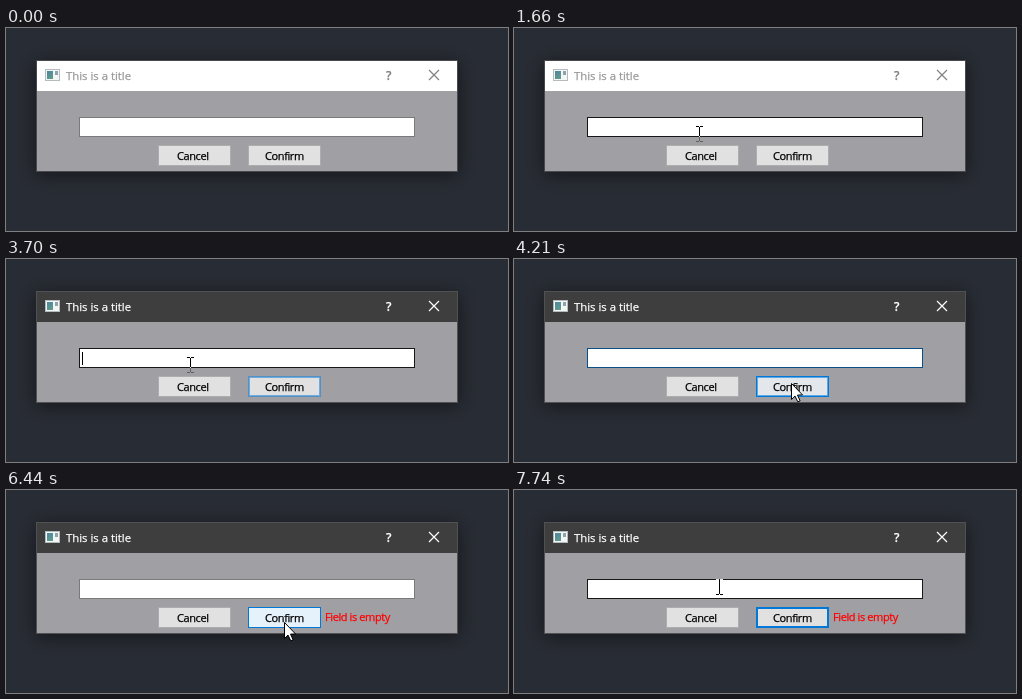
These frames come from a looping animation (502x203 px, 8 s). An HTML page with a canvas:

```html
<!DOCTYPE html>
<html lang="en">
<head>
<meta charset="utf-8">
<title>Dialog</title>
<style>
html, body { margin: 0; width: 100%; height: 100%; overflow: hidden; background: #282c34; }
canvas { display: block; }
</style>
</head>
<body>
<canvas id="stage" width="502" height="203"></canvas>
<script>
const ctx = document.getElementById('stage').getContext('2d');
const LOOP = 8000, BLINK = 530, FADE = 300;
const ACTIVATE = 3650, PRESS = 5040, RELEASE = 5130, REFOCUS = 7210;
const BLUE = '#0078d7';

const FIELD = { x: 73, y: 89, w: 336, h: 20 };
const CANCEL = { x: 152, y: 117, w: 73, h: 21 };
const CONFIRM = { x: 242, y: 117, w: 73, h: 21 };

// Stops of the pointer; it slows down towards each one
const STOPS = [
  { t: 310, x: 318, y: 178 },
  { t: 820, x: 251, y: 88 },
  { t: 1100, x: 210, y: 100 },
  { t: 1510, x: 185, y: 106 },
  { t: 4030, x: 184, y: 106 },
  { t: 4210, x: 277, y: 124 },
  { t: 4390, x: 292, y: 131 },
  { t: 4770, x: 291, y: 130 },
  { t: 6400, x: 291, y: 130 },
  { t: 6440, x: 278, y: 132 },
  { t: 6640, x: 276, y: 132 },
  { t: 7150, x: 193, y: 92 },
  { t: 7420, x: 205, y: 97 }
];

const clamp = v => Math.max(0, Math.min(1, v));
const ramp = (t, start, length) => clamp((t - start) / length);
const easeOut = k => 1 - (1 - k) ** 2;
const inside = (p, r) => p.x >= r.x && p.x < r.x + r.w && p.y >= r.y && p.y < r.y + r.h;

function pointerAt(t) {
  const next = STOPS.findIndex(s => s.t > t);
  if (next < 0) return STOPS[STOPS.length - 1];
  if (next === 0) return { x: -50, y: -50 };
  const a = STOPS[next - 1], b = STOPS[next];
  const k = easeOut(ramp(t, a.t, b.t - a.t));
  return { x: Math.round(a.x + (b.x - a.x) * k), y: Math.round(a.y + (b.y - a.y) * k) };
}

// Share of the last moments that the pointer spent over an area
function hover(t, area) {
  const steps = 30;
  let hits = 0;
  for (let i = 0; i < steps; i++) {
    if (inside(pointerAt(t - FADE * i / steps), area)) hits++;
  }
  return hits / steps;
}

function caretVisible(t) {
  const since = t >= REFOCUS ? REFOCUS : ACTIVATE;
  const focused = t >= since && (t < PRESS || t >= REFOCUS);
  return focused && Math.floor((t - since) / BLINK) % 2 === 0;
}

function rect(x, y, w, h, color) {
  ctx.fillStyle = color;
  ctx.fillRect(x, y, w, h);
}

function box({ x, y, w, h }, fill, border, line = 1, alpha = 1) {
  ctx.globalAlpha = alpha;
  rect(x + line, y + line, w - 2 * line, h - 2 * line, fill);
  ctx.strokeStyle = border;
  ctx.lineWidth = line;
  ctx.strokeRect(x + line / 2, y + line / 2, w - line, h - line);
  ctx.globalAlpha = 1;
}

function text(str, x, y, color, size, spacing = 0, weight = 400) {
  ctx.font = `${weight} ${size}px "Open Sans", "Noto Sans", sans-serif`;
  ctx.letterSpacing = spacing + 'px';
  ctx.fillStyle = ctx.strokeStyle = color;
  ctx.lineWidth = 0.25;
  ctx.fillText(str, x, y);
  ctx.strokeText(str, x, y);
}

const label = (str, x, y, color) => text(str, x, y, color, 11, -0.4);

function drawIcon() {
  box({ x: 39, y: 41, w: 15, h: 12 }, '#f4f6f6', '#b4bcbe');
  const glass = ctx.createLinearGradient(41, 43, 47, 52);
  glass.addColorStop(0, '#4f86a0');
  glass.addColorStop(1, '#63a087');
  rect(41, 43, 6, 8, glass);
  rect(49, 43, 3, 4, '#8fa4aa');
}

function drawWindow(active) {
  ctx.save();
  ctx.shadowColor = 'rgba(0,0,0,0.5)';
  ctx.shadowBlur = 18;
  ctx.shadowOffsetY = 3;
  rect(30, 32, 422, 112, active ? '#505153' : '#48494e');
  ctx.restore();
  rect(31, 33, 420, 30, active ? '#3e3e3e' : '#ffffff');
  rect(31, 63, 420, 80, '#a0a0a4');
  drawIcon();
  text('This is a title', 60, 52, active ? '#ffffff' : '#999999', 11.35);
  const glyph = active ? '#ffffff' : '#808080';
  text('?', 380, 52, glyph, 12, 0, 600);
  ctx.lineWidth = 1.2;
  ctx.beginPath();
  ctx.moveTo(423, 42); ctx.lineTo(433, 52);
  ctx.moveTo(433, 42); ctx.lineTo(423, 52);
  ctx.stroke();
}

function drawField(t) {
  const focus = t < REFOCUS
    ? ramp(t, ACTIVATE, 100) - ramp(t, PRESS, 200)
    : ramp(t, REFOCUS, 100);
  box(FIELD, '#ffffff', '#7a7a7a');
  box(FIELD, '#ffffff', BLUE, 1, focus);
  box(FIELD, '#ffffff', '#171717', 1, hover(t, FIELD));
  if (caretVisible(t)) rect(76, 93, 1, 13, '#000000');
}

function drawButtons(t) {
  box(CANCEL, '#e1e1e1', '#adadad');
  box(CONFIRM, '#e1e1e1', '#adadad');
  box(CONFIRM, '#e1e1e1', BLUE, 2, ramp(t, ACTIVATE, 100));
  box(CONFIRM, '#e5f1fb', BLUE, 1, hover(t, CONFIRM));
  if (t >= PRESS) box(CONFIRM, '#cce4f7', '#005499', 1, 1 - ramp(t, RELEASE, 140));
  label('Cancel', 171, 132, '#000000');
  label('Confirm', 259, 132, '#000000');
}

function drawArrow({ x, y }) {
  const shape = [[0, 0], [0, 16], [3.5, 12.6], [6.3, 18.3], [8.6, 17.3], [6, 11.6], [11, 11.4]];
  ctx.beginPath();
  shape.forEach(([dx, dy]) => ctx.lineTo(x + dx + 0.5, y + dy + 0.5));
  ctx.closePath();
  ctx.fillStyle = '#ffffff';
  ctx.fill();
  ctx.strokeStyle = '#000000';
  ctx.lineWidth = 1;
  ctx.stroke();
}

// The text pointer inverts whatever lies below it
function drawBeam({ x, y }) {
  ctx.globalCompositeOperation = 'difference';
  rect(x, y - 7, 1, 14, '#ffffff');
  for (const row of [y - 8, y + 7]) {
    rect(x - 3, row, 3, 1, '#ffffff');
    rect(x + 1, row, 3, 1, '#ffffff');
  }
  ctx.globalCompositeOperation = 'source-over';
}

function render(t) {
  rect(0, 0, 502, 203, '#282c34');
  drawWindow(t >= ACTIVATE);
  drawField(t);
  drawButtons(t);
  if (t >= RELEASE) label('Field is empty', 319, 131, '#ff0000');
  const pointer = pointerAt(t);
  (inside(pointer, FIELD) ? drawBeam : drawArrow)(pointer);
}

const start = performance.now();
function tick() {
  render((performance.now() - start) % LOOP);
  requestAnimationFrame(tick);
}
tick();
</script>
</body>
</html>
```
